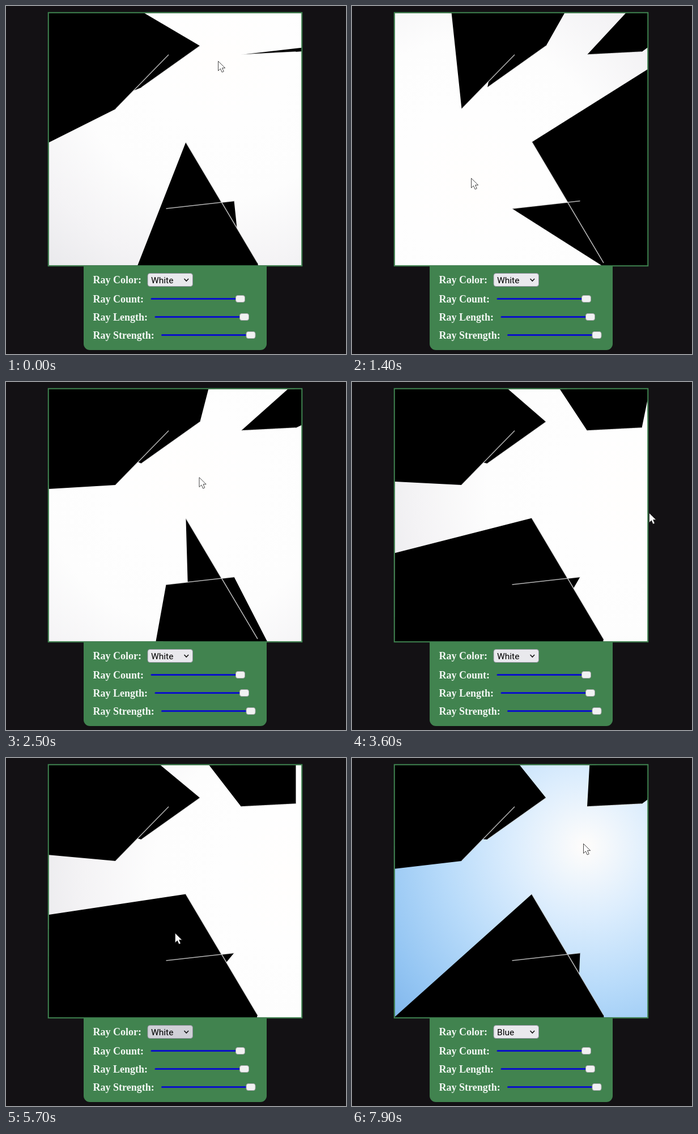
Write an HTML page with a canvas that moves like this. It is 600 by 615 pixels and loops after 8000 ms.

```html
<!DOCTYPE html>
<html lang="en">
<head>
<meta charset="utf-8">
<title>Ray casting</title>
<style>
  html, body { margin: 0; width: 100%; height: 100%; overflow: hidden; background: #131114; }
  canvas, svg { position: absolute; left: 0; top: 0; }
  .label { font: bold 18px "Liberation Serif", "Times New Roman", serif; fill: #f3f8f4; }
  #choice { font: 15.5px Roboto, Arial, sans-serif; fill: #000; }
  .track { fill: #0a10c8; }
  .thumb { fill: #f1f1f2; stroke: #a3a3a8; }
</style>
</head>
<body>
<canvas id="stage" width="600" height="615"></canvas>
<svg width="600" height="615" viewBox="0 0 600 615">
  <path d="M137 459H460V597a11 11 0 0 1 -11 11H148a11 11 0 0 1 -11 -11Z" fill="#41834f"/>
  <rect x="74.75" y="11.75" width="447.5" height="447.5" fill="none" stroke="#3f834f" stroke-width="2"/>
  <text class="label" x="153.5" y="490">Ray Color:</text>
  <rect id="box" x="250" y="472.5" width="79.5" height="23" rx="4" stroke="#8f8f9d"/>
  <text id="choice" x="256" y="489.5">White</text>
  <path d="M314.5 482l3.8 4 3.8 -4" fill="none" stroke="#111" stroke-width="1.6"/>
  <g id="sliders"></g>
  <path id="cursor" d="M.5 .5V17.5L4.4 13.8 7.2 20 10.2 18.7 7.5 12.6H12.7Z"
        fill="#fff" stroke="#333" stroke-width=".9" stroke-linejoin="round"/>
</svg>
<script>
const LOOP = 8000, STEP = 100, RAYS = 2000, REACH = 500;
const LEAVE = 3560, OPEN = 4050, PICK = 6400, BACK = 7400;
const $ = id => document.getElementById(id);
const ctx = $('stage').getContext('2d');

const sliders = { Count: 255.5, Length: 262.5, Strength: 274 };
$('sliders').innerHTML = Object.entries(sliders).map(([name, x], i) => {
  const y = 524 + 32 * i;
  return `<text class="label" x="153.5" y="${y}">Ray ${name}:</text>
    <rect class="track" x="${x}" y="${y - 8}" width="156" height="3" rx="1.5"/>
    <rect class="thumb" x="${x + 150}" y="${y - 12.5}" width="16" height="12" rx="3.5"/>`;
}).join('');

// Wall ends: x1, y1, x2, y2
const walls = [
  [193.5, 182, 287, 86], [239, 144, 342.3, 70.6], [415, 86, 511.5, 81],
  [317.4, 240.5, 444, 454], [282.5, 358, 402.5, 344.5]
];
const l = 75.5, t = 12.5, r = 521.5, b = 458.5;
const edges = [...walls, [l, t, r, t], [r, t, r, b], [r, b, l, b], [l, b, l, t]];

// Key points of the pointer: time, x, y
const path = [
  [-100, 376, 90.5], [0, 374, 97], [700, 268.5, 269], [800, 260, 276], [1300, 207, 310],
  [1800, 236, 225.5], [1900, 236, 210], [3000, 420, 150], [3200, 420, 150],
  [3500, 488, 197], [3600, 524, 231], [3800, 534, 400], [4000, 420, 498], [4200, 290, 484],
  [4500, 290, 324], [4600, 290, 324], [5000, 300, 88], [5700, 298, 309],
  [6400, 287, 283], [7400, 287, 283], [7700, 418, 185], [7800, 411, 156.5], [7900, 408, 151]
];

function slope(i, k) {
  const p = path[Math.max(i - 1, 0)], c = path[i], n = path[Math.min(i + 1, path.length - 1)];
  const turns = (c[k] - p[k]) * (n[k] - c[k]) <= 0;
  return turns ? 0 : (n[k] - p[k]) / (n[0] - p[0]);
}

// Smooth curve through the key points
function pointer(time) {
  const i = Math.min(path.findLastIndex(p => p[0] <= time), path.length - 2);
  const a = path[i], c = path[i + 1], d = c[0] - a[0], u = (time - a[0]) / d, v = 1 - u;
  return [1, 2].map(k =>
    a[k] * v * v * (1 + 2 * u) + c[k] * u * u * (3 - 2 * u) +
    d * u * v * (v * slope(i, k) - u * slope(i + 1, k)));
}

// The light follows one step late and rests while the pointer is away
function lightAt(time) {
  const late = time - STEP;
  return pointer(late > LEAVE && late < BACK ? LEAVE : late);
}

// Nearest point hit by a ray
function cast(x, y, angle) {
  const dx = Math.cos(angle), dy = Math.sin(angle);
  let best = 900;
  for (const [x1, y1, x2, y2] of edges) {
    const ex = x2 - x1, ey = y2 - y1, det = dx * ey - dy * ex;
    const dist = ((x1 - x) * ey - (y1 - y) * ex) / det;
    const at = ((x1 - x) * dy - (y1 - y) * dx) / det;
    if (dist > 0 && dist < best && at >= 0 && at <= 1) best = dist;
  }
  return [x + dx * best, y + dy * best];
}

// Evenly spaced from the light outwards
const tones = {
  White: ['#fffefd', '#fefefe', '#fdfdfd', '#f4f3f5', '#e7e7ea'],
  Blue: ['#fffdfb', '#dcedfd', '#b8dbfa', '#95c6f3', '#75ade7']
};

const sweep = Array.from({ length: RAYS }, (_, i) => (2 * i / RAYS - 1) * Math.PI);

function drawLight(x, y, color) {
  ctx.fillStyle = '#000';
  ctx.fillRect(l, t, r - l, b - t);

  ctx.strokeStyle = '#b4b4b4';
  ctx.lineWidth = 1.5;
  ctx.beginPath();
  for (const [x1, y1, x2, y2] of walls) {
    ctx.moveTo(x1, y1);
    ctx.lineTo(x2, y2);
  }
  ctx.stroke();

  const glow = ctx.createRadialGradient(x, y, 0, x, y, REACH);
  tones[color].forEach((tone, i, all) => glow.addColorStop(i / (all.length - 1), tone));
  ctx.fillStyle = glow;

  // Even rays, plus some just beside each wall end
  const ends = edges
    .flatMap(([x1, y1, x2, y2]) => [Math.atan2(y1 - y, x1 - x), Math.atan2(y2 - y, x2 - x)])
    .flatMap(a => [a - 1e-4, a, a + 1e-4]);
  ctx.beginPath();
  for (const a of [...sweep, ...ends].sort((p, q) => p - q)) ctx.lineTo(...cast(x, y, a));
  ctx.fill();
}

let shown = '';
function draw(time) {
  const color = time > PICK ? 'Blue' : 'White';
  const [x, y] = lightAt(time), key = `${x} ${y} ${color}`;
  if (key !== shown) drawLight(x, y, color);
  shown = key;
  $('choice').textContent = time >= PICK ? 'Blue' : 'White';
  $('box').setAttribute('fill', time > OPEN && time < PICK ? '#d0d0d7' : '#e9e9ed');
  $('cursor').setAttribute('transform', `translate(${pointer(time)})`);
}

let start;
function tick(now) {
  start ??= now;
  draw(Math.floor((now - start) % LOOP / STEP) * STEP);
  requestAnimationFrame(tick);
}
draw(0);
requestAnimationFrame(tick);
</script>
</body>
</html>
```
